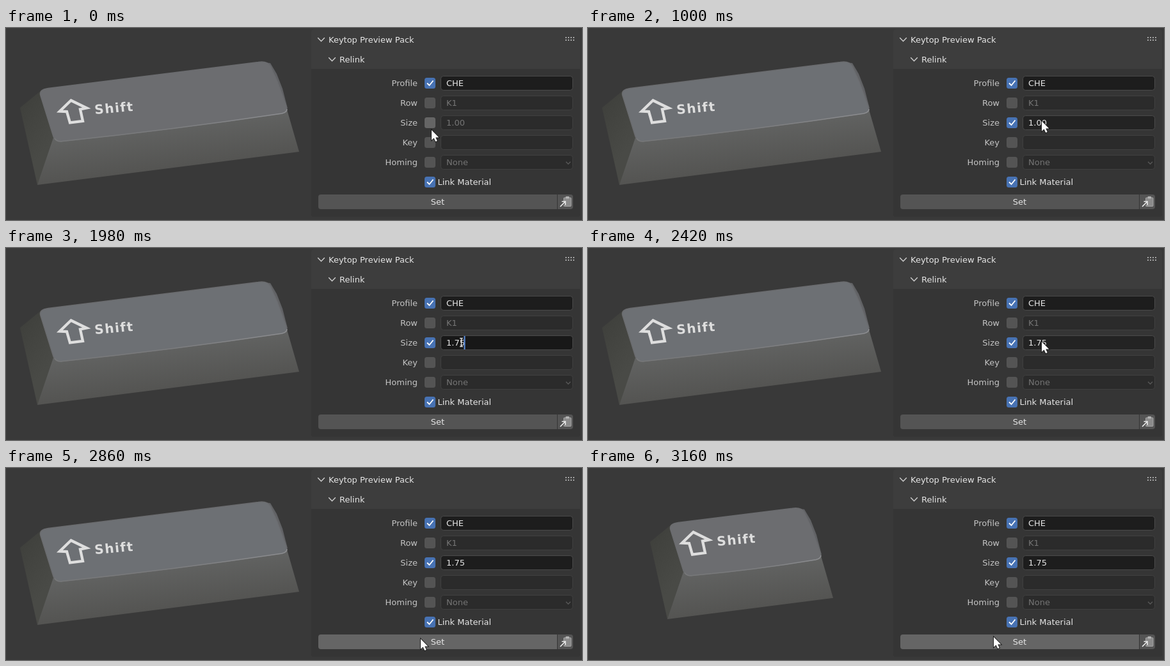
Animation of 900x301 px, one loop 4360 ms. Source, as an HTML page with a canvas:

```html
<!DOCTYPE html>
<html lang="en">
<head>
<meta charset="utf-8">
<title>Keycap size panel</title>
<style>
  html, body { margin: 0; width: 100%; height: 100%; overflow: hidden; background: #393939; }
  canvas { display: block; }
</style>
</head>
<body>
<canvas id="stage" width="900" height="301"></canvas>
<script>
const ctx = document.getElementById('stage').getContext('2d');
const LOOP = 4360;
const BLUE = '#4772b3', GREY = '#545454', HOVER = '#656565', WHITE = '#e6e6e6', DIM = '#757575';
const UI_FONT = '13px "DejaVu Sans", sans-serif';

// Pointer stops: time, x, y of the tip
const pointerStops = [
  [0, 665, 160], [130, 664, 155], [280, 666, 151], [430, 665, 153], [850, 705, 149],
  [1000, 709, 146], [2130, 709, 147], [2570, 674, 176], [2710, 653, 245],
  [2860, 648, 268], [3010, 634, 265]
];
// Content of the size field: time, text
const sizeStops = [[0, '1.00'], [1410, '1'], [1560, '1.'], [1980, '1.75']];

const at = (stops, t) => stops.filter(s => s[0] <= t).pop();
const within = (t, from, to) => t >= from && t < to;

function box(x, y, w, h, r, fill, stroke) {
  ctx.beginPath();
  ctx.roundRect(x, y, w, h, r);
  ctx.fillStyle = fill;
  ctx.fill();
  if (stroke) {
    ctx.strokeStyle = stroke;
    ctx.lineWidth = 1;
    ctx.stroke();
  }
}

function text(str, x, y, fill, align = 'left') {
  ctx.font = UI_FONT;
  ctx.textAlign = align;
  ctx.fillStyle = fill;
  ctx.fillText(str, x, y);
}

function trace(points, close) {
  ctx.beginPath();
  points.forEach(p => ctx.lineTo(p[0], p[1]));
  if (close) ctx.closePath();
}

function line(points, stroke, width, close) {
  trace(points, close);
  ctx.strokeStyle = stroke;
  ctx.lineWidth = width;
  ctx.stroke();
}

function shape(points, fill) {
  trace(points, true);
  ctx.fillStyle = fill;
  ctx.fill();
}

function ramp(from, to, ...colors) {
  const g = ctx.createLinearGradient(...from, ...to);
  colors.forEach((c, i) => g.addColorStop(i / (colors.length - 1), c));
  return g;
}

const chevron = (x, y, r, color) =>
  line([[x - r, y - r / 2], [x, y + r / 2], [x + r, y - r / 2]], color, 1.4);

// Both ends of the keycap move inwards by d along its tilted long side
function keycap(d, tint) {
  const L = (x, y) => [x + d, y - d * 0.12];
  const R = (x, y) => [x - d, y + d * 0.13];
  const left = L(49, 246), right = R(458, 194);
  const sag = [(L(88, 0)[0] + R(432, 0)[0]) / 2, (L(0, 178)[1] + R(0, 133)[1]) / 2 + 4];

  shape([L(22, 125), L(56, 97), L(66, 100), L(84, 178), left],
    ramp(L(22, 130), L(76, 170), '#40413d', '#494a46'));
  shape([L(74, 172), L(84, 174), R(424, 126), R(439, 128), right, left],
    ramp(L(84, 176), L(92, 240), '#616261', '#545452'));
  shape([R(404, 54), R(413, 55), R(423, 72), R(432, 95), R(440, 126), R(430, 130)], '#616265');

  ctx.beginPath();
  ctx.moveTo(...L(66, 94.5));
  ctx.lineTo(...R(394, 53.5));
  ctx.quadraticCurveTo(...R(408, 51), ...R(413, 60));
  ctx.lineTo(...R(424, 84));
  ctx.lineTo(...R(438, 123));
  ctx.quadraticCurveTo(...R(440, 132), ...R(431, 134));
  ctx.quadraticCurveTo(...sag, ...L(88, 177.5));
  ctx.quadraticCurveTo(...L(77, 179), ...L(74, 170));
  ctx.lineTo(...L(54, 106));
  ctx.quadraticCurveTo(...L(51, 96.5), ...L(66, 94.5));
  ctx.fillStyle = tint;
  ctx.fill();
  ctx.strokeStyle = '#6b6c6f';
  ctx.lineWidth = 1.5;
  ctx.stroke();

  ctx.beginPath();
  ctx.moveTo(...R(439, 127));
  ctx.quadraticCurveTo(...R(439, 132), ...R(431, 134));
  ctx.quadraticCurveTo(...sag, ...L(88, 177.5));
  ctx.quadraticCurveTo(...L(80, 179), ...L(76, 173));
  ctx.strokeStyle = ramp(L(76, 173), R(439, 127), '#777879', '#7b7c7e', '#8d8e91');
  ctx.lineWidth = 1.6;
  ctx.stroke();

  ctx.save();
  ctx.translate(d * 0.84, -d * 0.173);
  line([[101.5, 113.5], [126, 125.5], [116, 127.5], [120, 146], [100, 148.5], [95, 131], [84, 130.5]],
    '#dedede', 4.3, true);
  ctx.transform(1, -0.085, 0.1, 1, 139, 135);
  ctx.font = 'bold 20px "DejaVu Sans", sans-serif';
  ctx.letterSpacing = '1.5px';
  ctx.textAlign = 'left';
  ctx.fillStyle = '#dedede';
  ctx.fillText('Shift', 0, 0);
  ctx.restore();
}

function checkbox(y, on, hover) {
  const fill = on ? (hover ? '#5680c2' : BLUE) : (hover ? HOVER : GREY);
  box(654, y - 8.5, 17, 17, 3.5, fill);
  if (on) line([[658, y], [661.5, y + 3.5], [667.5, y - 4]], '#fff', 1.8);
}

function row(label, y, value, on, hover, fill = '#1d1d1d') {
  text(label, 643, y + 4.5, '#c4c4c4', 'right');
  checkbox(y, on, hover);
  box(679.5, y - 11, 206, 22, 4, on ? fill : '#2b2b2b', on ? '#4a4a4a' : '#404040');
  text(value, 688, y + 4.5, on ? WHITE : DIM);
}

function panel(t) {
  const size = at(sizeStops, t)[1];
  const editing = within(t, 1280, 2130);
  const over = within(t, 850, 1280) || within(t, 2130, 2570);
  const on = t >= 430;

  box(477, 2, 420, 294, 4, '#353535');
  box(477, 2, 420, 62, [4, 4, 0, 0], '#3d3d3d');
  chevron(492.5, 18, 5.3, '#cfcfcf');
  chevron(509.5, 49, 5.3, '#cfcfcf');
  text('Keytop Preview Pack', 504, 23, WHITE);
  text('Relink', 521, 53.5, WHITE);
  ctx.fillStyle = '#a4a4a4';
  for (let i = 0; i < 8; i++) ctx.fillRect(874 + (i % 4) * 4, i < 4 ? 14 : 18, 2, 2);

  row('Profile', 86.5, 'CHE', true);
  row('Row', 117.5, 'K1', false);
  row('Size', 148.5, size, on, t < 850, editing ? '#181818' : over ? '#232323' : '#1d1d1d');
  row('Key', 179.5, '', false);
  row('Homing', 210.5, 'None', false);
  chevron(878.5, 211.5, 3.5, '#585858');
  checkbox(241.5, true);
  text('Link Material', 674.5, 246, WHITE);

  if (editing) {
    const end = 687 + ctx.measureText(size).width;
    if (t < 1410) {
      ctx.fillStyle = BLUE;
      ctx.fillRect(687, 138, end - 687, 21);
      text(size, 688, 153, WHITE);
    }
    ctx.fillStyle = '#5c8fe0';
    ctx.fillRect(Math.round(end) - 0.5, 138, 2, 21);
  }

  const setFill = t < 2860 ? GREY : within(t, 3010, 3160) ? BLUE : HOVER;
  box(488, 261, 373, 23, [4, 0, 0, 4], setFill);
  text('Set', 674.5, 277, WHITE, 'center');
  box(862, 261, 24, 23, [0, 4, 4, 0], GREY);
  pasteIcon();
}

function pasteIcon() {
  box(871.5, 266, 11.5, 13.5, 1, '#8b8b8b', '#a2a2a2');
  box(874.5, 264, 5.5, 3.5, 1, '#b4b4b4');
  line([[866, 280], [873.5, 272.5]], GREY, 4.5);
  line([[866, 280], [873.5, 272.5]], '#f0f0f0', 1.6);
  line([[868.5, 272], [874, 272], [874, 277.5]], '#f0f0f0', 1.6);
}

function clickSpot() {
  ctx.beginPath();
  ctx.arc(664, 153, 15, 0, Math.PI * 2);
  ctx.fillStyle = 'rgba(250,240,15,.6)';
  ctx.fill();
}

function pointer(t) {
  if (within(t, 1280, 2130)) {
    const beam = [[[709, 141.5], [714, 141.5]], [[711.5, 141.5], [711.5, 154.5]], [[709, 154.5], [714, 154.5]]];
    beam.forEach(p => line(p, '#f0f0f0', 1.2));
    return;
  }
  const [, x, y] = at(pointerStops, t);
  ctx.save();
  ctx.translate(x, y);
  const arrow = [[0, 0], [0, 15.8], [3.6, 12.4], [6.2, 18], [8.8, 16.9], [6.3, 11.5], [11.3, 11.5]];
  line(arrow, '#1a1a1a', 1.8, true);
  shape(arrow, '#fff');
  ctx.restore();
}

function draw(now) {
  const t = now % LOOP;
  const small = t >= 3160;
  ctx.fillStyle = '#393939';
  ctx.fillRect(0, 0, 900, 301);
  keycap(small ? 75 : 0, t < 430 || small ? '#6c6d70' : '#6d7074');
  panel(t);
  pointer(t);
  if (within(t, 430, 710)) clickSpot();
}

const start = performance.now();
function tick() {
  draw(performance.now() - start);
  requestAnimationFrame(tick);
}
tick();
</script>
</body>
</html>
```
